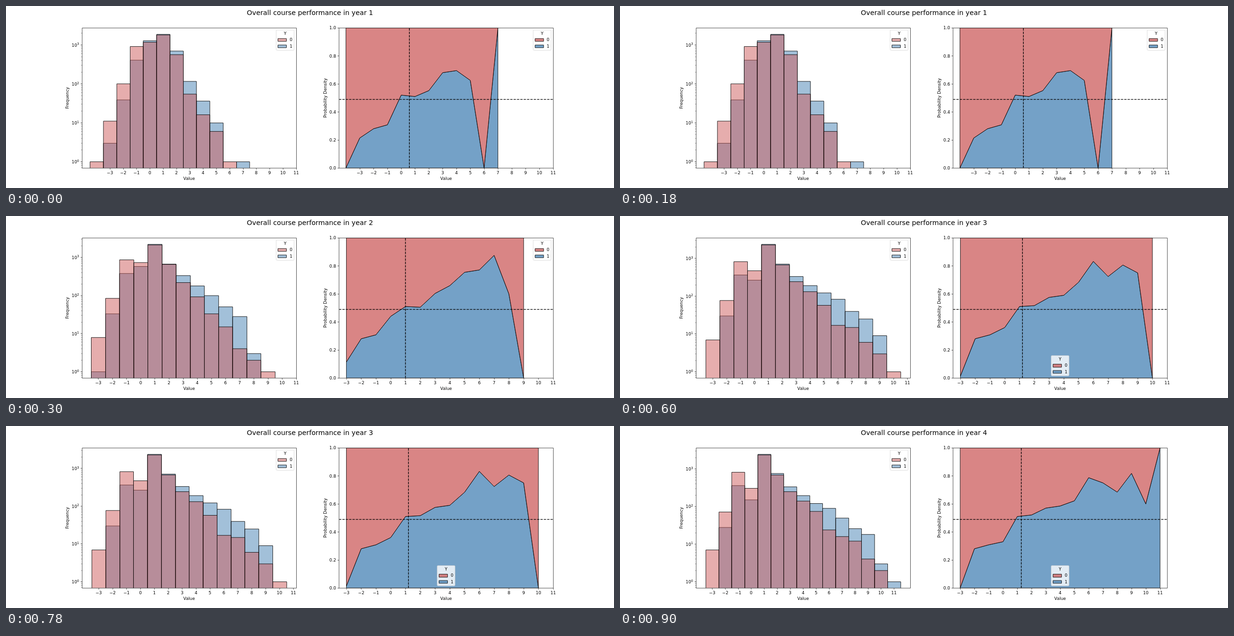
Write an HTML page with a canvas that moves like this. It is 1280 px wide and 384 px high and loops after 1.2 s.

```html
<!DOCTYPE html>
<html lang="en">
<head>
<meta charset="utf-8">
<title>Overall course performance</title>
<style>
  html, body { margin: 0; width: 100%; height: 100%; overflow: hidden; background: #fff; }
  canvas { display: block; }
</style>
</head>
<body>
<canvas id="stage" width="1280" height="384"></canvas>
<script>
const ctx = document.getElementById('stage').getContext('2d');
const STEP = 300;
// The figure is laid out at 2000 x 600 and scaled down to the stage.
const ZOOM = 0.64, PT = 100 / 72, FONT = 10 * PT;
const TOP = 72, BOTTOM = 534, HEIGHT = BOTTOM - TOP, WIDTH = 704.545;
const HIST_X = 250, FILL_X = 1095.455;
const RED = '205,92,92', BLUE = '70,130,180';
const BASE_RATE = 0.489;

// tail: head counts at value 3 and at the two values before the last.
// shares: key points of the Y = 1 share, from value 2 upwards.
const years = [
  { tail: [172, 16, 1], shares: [0.552, 0.68, 0.695, 0.625, 0, 1] },
  { tail: [555, 32, 5], shares: [0.505, 0.603, 0.659, 0.754, 0.771, 0.875, 0.6, 0] },
  { tail: [577, 31, 12], shares: [0.516, 0.575, 0.59, 0.683, 0.832, 0.724, 0.806, 0.75, 0] },
  { tail: [582, 22, 5], shares: [0.521, 0.57, 0.585, 0.622, 0.787, 0.75, 0.684, 0.818, 0.6, 1] }
].map(model);

// Low values settle by halves each year; high values fall off geometrically.
function model({ tail: [start, knee, next], shares }, y) {
  const settle = (limit, change) => limit + change * 0.5 ** y;
  const first = y ? -3 : -4, last = shares.length + 1;
  const totals = [
    settle(5.52, 7.88), settle(95, 45), settle(1150, 174),
    settle(170, 2282), settle(4950, -1275), 1255 + 65 * y
  ];
  const steps = last - 5;
  for (let i = 0; i <= steps; i++) totals.push(start * (knee / start) ** (i / steps));
  totals.push(next, 1);
  const rates = [Math.max(0, 0.214 - 0.1 * y), 0.28, 0.308, Math.max(0.33, 0.52 - 0.08 * y), 0.51, ...shares];
  if (first < -3) {
    totals.unshift(1);
    rates.unshift(0);
  }
  const low = first - 0.5, high = last + 0.5, margin = (high - low) / 20;
  return {
    first, rates,
    zero: totals.map((n, i) => Math.round(n * (1 - rates[i]))),
    one: totals.map((n, i) => Math.round(n * rates[i])),
    mean: 1.377 - 0.777 * 0.485 ** y,
    hist: [low - margin, Math.max(11, high + margin)],
    fill: [low, Math.max(11, high)],
    lowLegend: y > 1
  };
}

const snap = v => Math.floor(v + 0.5) + 0.5;
const scaleX = (left, [min, max]) => v => left + WIDTH * (v - min) / (max - min);
const rateY = p => BOTTOM - HEIGHT * p;

function text(str, x, y, align = 'center', size = FONT) {
  ctx.font = `${size}px "DejaVu Sans", sans-serif`;
  ctx.textAlign = align;
  ctx.fillStyle = '#000';
  ctx.fillText(str, x, y);
}

function sideText(str, x) {
  ctx.save();
  ctx.translate(x, (TOP + BOTTOM) / 2);
  ctx.rotate(-Math.PI / 2);
  text(str, 0, 0);
  ctx.restore();
}

function outline(points) {
  ctx.lineWidth = points * PT;
  ctx.strokeStyle = '#000';
  ctx.stroke();
}

function line(x1, y1, x2, y2, points) {
  ctx.beginPath();
  ctx.moveTo(x1, y1);
  ctx.lineTo(x2, y2);
  outline(points);
}

function box(x1, y1, x2, y2, fill, points = 1) {
  const x = snap(x1), y = snap(y1);
  ctx.beginPath();
  ctx.rect(x, y, snap(x2) - x, snap(y2) - y);
  ctx.fillStyle = fill;
  ctx.fill();
  outline(points);
}

function clipped(left, draw) {
  ctx.save();
  ctx.beginPath();
  ctx.rect(left, TOP, WIDTH, HEIGHT);
  ctx.clip();
  draw();
  ctx.restore();
}

function frame(left, x) {
  box(left, TOP, left + WIDTH, BOTTOM, 'transparent', 0.8);
  for (let v = -3; v <= 11; v++) {
    const tx = snap(x(v));
    line(tx, snap(BOTTOM), tx, snap(BOTTOM) + 3.5 * PT, 0.8);
    text(String(v).replace('-', '\u2212'), x(v), 555);
  }
  text('Value', left + WIDTH / 2, 574);
}

function tickY(left, y, length, points) {
  line(snap(left) - length * PT, snap(y), snap(left), snap(y), points);
}

function legend(x, y, alpha) {
  ctx.beginPath();
  ctx.roundRect(x, y, 58.8, 67, 2.8);
  ctx.fillStyle = 'rgba(255,255,255,0.8)';
  ctx.fill();
  ctx.lineWidth = PT;
  ctx.strokeStyle = 'rgba(204,204,204,0.8)';
  ctx.stroke();
  text('Y', x + 29.4, y + 17);
  [RED, BLUE].forEach((rgb, i) => {
    const base = y + 37.5 + 20.9 * i;
    box(x + 5.56, base - 9.72, x + 33.3, base, `rgba(${rgb},${alpha})`);
    text(i, x + 44.4, base, 'left');
  });
}

function histogram(year) {
  const x = scaleX(HIST_X, year.hist);
  const span = Math.log10(Math.max(...year.zero, ...year.one));
  const y = v => BOTTOM - HEIGHT * (Math.log10(v) / span + 0.05) / 1.1;
  const bars = (counts, rgb) => counts.forEach((n, i) => {
    const v = year.first + i;
    if (n) box(x(v - 0.5), y(n), x(v + 0.5), BOTTOM + 20, `rgba(${rgb},0.5)`);
  });
  clipped(HIST_X, () => {
    bars(year.one, BLUE);
    bars(year.zero, RED);
  });
  frame(HIST_X, x);
  for (let e = -1; e <= 3; e++) {
    for (let d = 1; d <= 9; d++) {
      const ty = y(d * 10 ** e);
      if (ty > BOTTOM || ty < TOP) continue;
      tickY(HIST_X, ty, d > 1 ? 2 : 3.5, d > 1 ? 0.6 : 0.8);
      if (d > 1) continue;
      text('10', 216, ty + 6, 'left');
      text(e, 233.8, ty + 0.7, 'left', FONT * 0.7);
    }
  }
  sideText('Frequency', 207);
  legend(888.8, 78.9, 0.5);
}

function proportions(year) {
  const x = scaleX(FILL_X, year.fill);
  const curve = year.rates.map((p, i) => [x(year.first + i), rateY(p)]);
  const area = (edge, rgb) => {
    ctx.beginPath();
    ctx.moveTo(curve[0][0], edge);
    curve.forEach(p => ctx.lineTo(...p));
    ctx.lineTo(curve[curve.length - 1][0], edge);
    ctx.closePath();
    ctx.fillStyle = `rgba(${rgb},0.75)`;
    ctx.fill();
    outline(1);
  };
  clipped(FILL_X, () => {
    area(BOTTOM, BLUE);
    area(TOP, RED);
    ctx.setLineDash([5.55 * PT, 2.4 * PT]);
    const rate = Math.round(rateY(BASE_RATE)), mean = Math.round(x(year.mean));
    line(FILL_X, rate, FILL_X + WIDTH, rate, 1.5);
    line(mean, BOTTOM, mean, TOP, 1.5);
  });
  frame(FILL_X, x);
  for (let i = 0; i <= 5; i++) {
    const y = rateY(i / 5);
    tickY(FILL_X, y, 3.5, 0.8);
    text((i / 5).toFixed(1), 1085.7, y + 5.2, 'right');
  }
  sideText('Probability Density', 1054.5);
  if (year.lowLegend) legend(1418.3, 460, 0.75);
  else legend(1734.2, 78.9, 0.75);
}

function render() {
  const index = Math.floor(performance.now() / STEP) % years.length;
  ctx.setTransform(ZOOM, 0, 0, ZOOM, 0, 0);
  ctx.fillStyle = '#fff';
  ctx.fillRect(0, 0, 2000, 600);
  text(`Overall course performance in year ${index + 1}`, 1000, 29, 'center', 16 * PT);
  histogram(years[index]);
  proportions(years[index]);
  requestAnimationFrame(render);
}
render();
</script>
</body>
</html>
```
